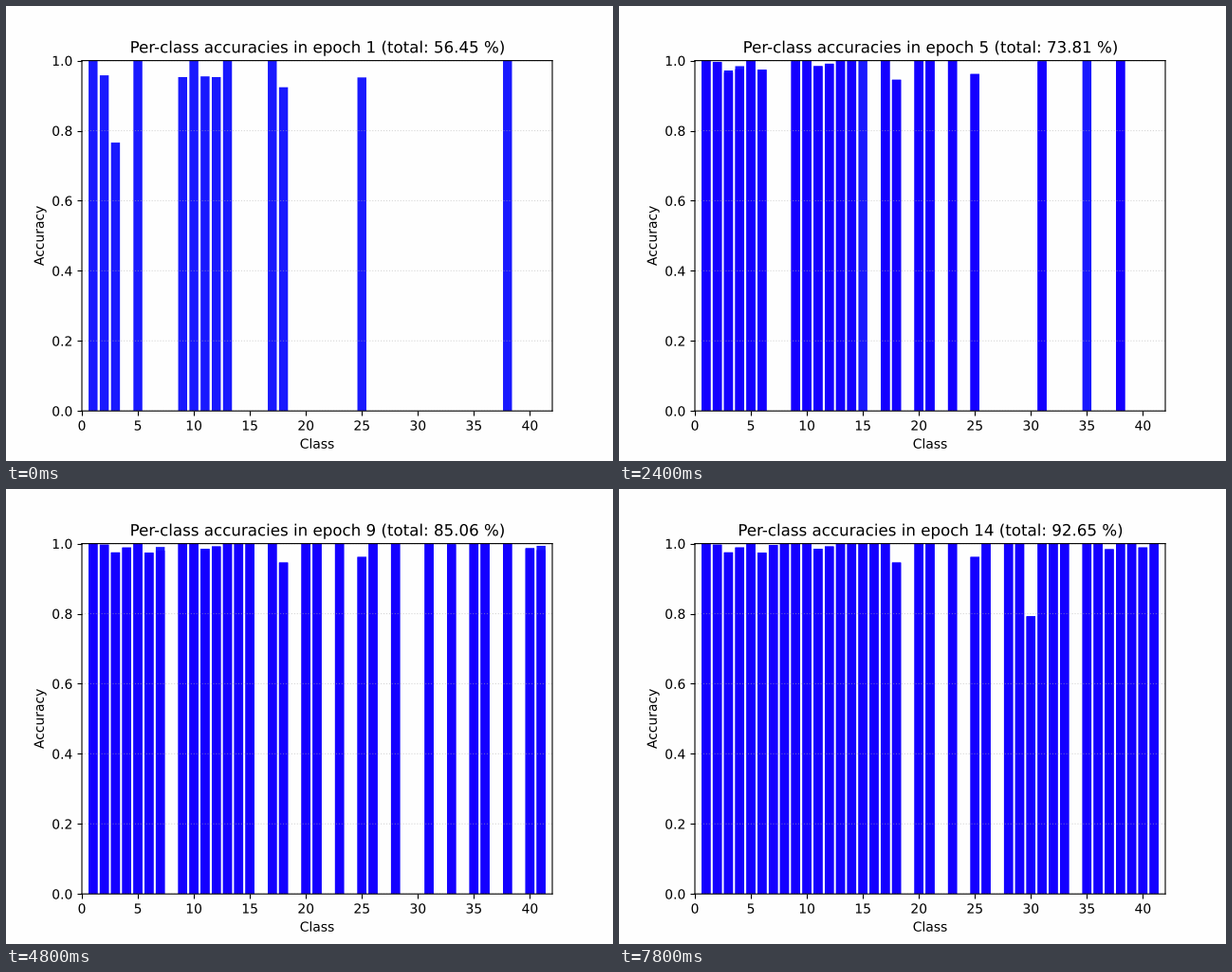
These frames come from a looping animation (640 px wide and 480 px high, 8 s). A matplotlib script:

```python
import matplotlib.pyplot as plt
import numpy as np
from matplotlib import patheffects
from matplotlib.animation import FuncAnimation

# Smooth, unsnapped edges and outlines for text
plt.rcParams.update({
    "path.snap": False,
    "text.hinting": "no_hinting",
    "path.effects": [patheffects.Normal()],
})

PAPER = "#fefefe"
FRESH = "#0000ff"
SETTLED = "#1400ff"
STEPS_PER_EPOCH = 3
STEP_MS = 200
STEPS = 40
CLASSES = 42
DECAY = 0.35

# Classes that are first recognised in each epoch
LEARNED = [(1, 2, 3, 5, 9, 10, 11, 12, 13, 17, 18, 25, 38), (6, 14, 31),
           (4, 23), (20, 21), (15, 35), (33, 41), (28, 36), (7, 26, 40),
           (), (16, 29, 32), (30, 37, 39), (8,)]

# First and final accuracy of the imperfect classes
SPANS = {2: (.958, .997), 3: (.766, .975), 4: (.950, .989), 6: (.974, .974),
         7: (.980, .996), 9: (.953, 1), 11: (.955, .985), 12: (.953, .992),
         18: (.924, .946), 25: (.952, .962), 30: (.775, .794), 31: (.974, 1),
         33: (.976, 1), 37: (.984, .984), 40: (.985, .989), 41: (.850, 1)}


def total(epoch):
    return np.interp(epoch, [1, 2, 4, 6, 9, 12, 14],
                     [56.45, 62.77, 70.28, 77.33, 85.06, 92.28, 92.65])


def accuracies(epoch):
    """Each class eases from its first to its final accuracy."""
    heights = np.zeros(CLASSES)
    for start, labels in enumerate(LEARNED[:epoch], 1):
        for label in labels:
            first, final = SPANS.get(label, (1, 1))
            heights[label] = final - (final - first) * DECAY ** (epoch - start)
    return heights


fig, ax = plt.subplots(figsize=(6.4, 4.8), dpi=100, facecolor=PAPER)
ax.set_facecolor(PAPER)
ax.grid(axis="y", linestyle=":", color="#b0b0b0", linewidth=0.8, alpha=0.5)
fresh = ax.bar(range(CLASSES), np.zeros(CLASSES), color=FRESH, alpha=0.9)
settled = ax.bar(range(CLASSES), np.zeros(CLASSES), color=SETTLED)
ax.set(xlim=(0, CLASSES), ylim=(0, 1), xlabel="Class", ylabel="Accuracy")
title = ax.set_title("")


def set_heights(bars, heights):
    for bar, height in zip(bars, heights):
        bar.set_height(height)
        bar.set_visible(height > 0)


def draw(step):
    epoch = step // STEPS_PER_EPOCH + 1
    set_heights(fresh, accuracies(epoch))
    set_heights(settled, accuracies(epoch - 1))
    title.set_text(f"Per-class accuracies in epoch {epoch} "
                   f"(total: {total(epoch):.2f} %)")
    return [*fresh, *settled, title]


anim = FuncAnimation(fig, draw, frames=STEPS, interval=STEP_MS,
                     repeat=True, repeat_delay=0, blit=False)
plt.show()
```
